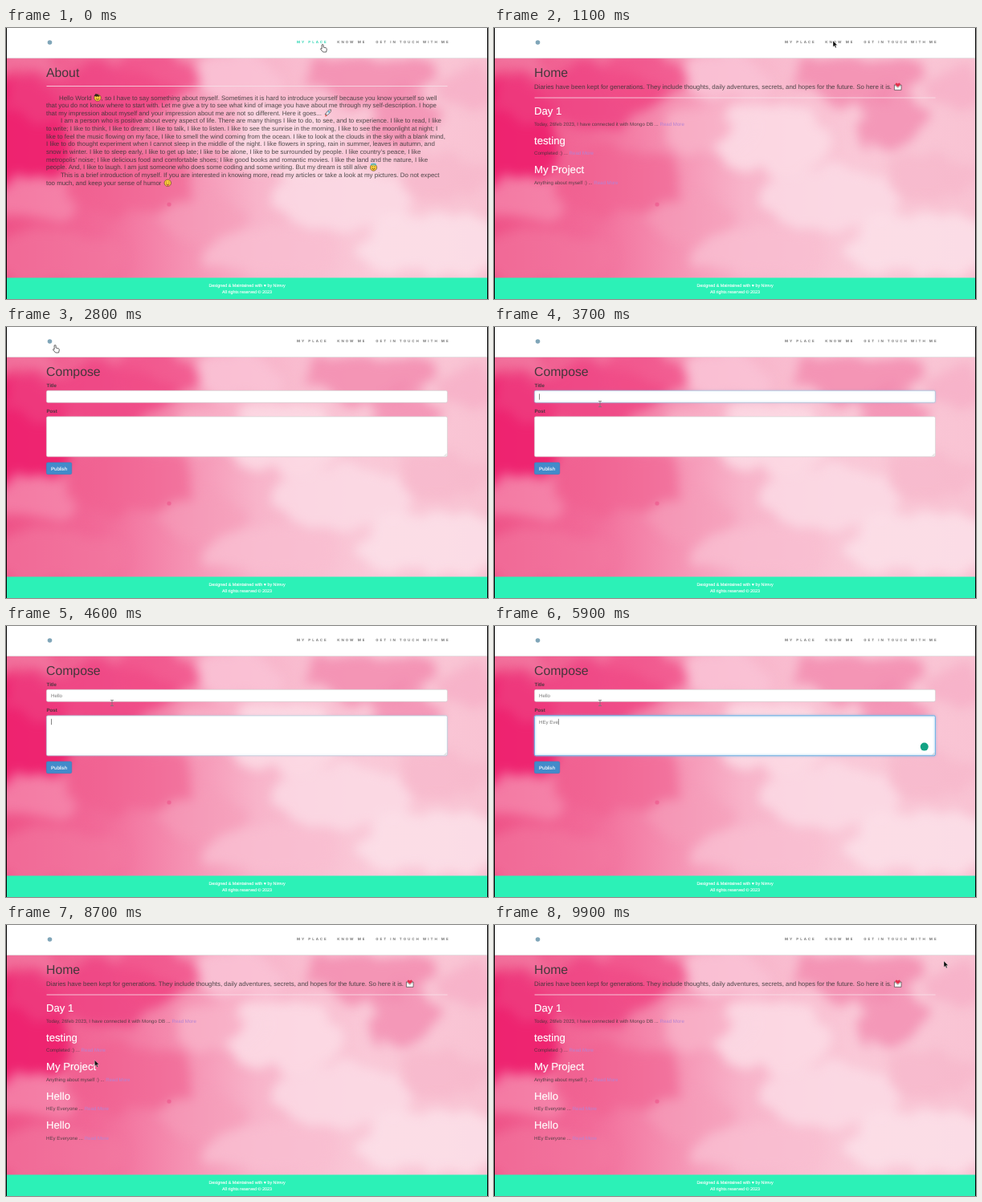
Animation of 600 by 338 pixels, one loop 10000 ms. Source, as an HTML page:

```html
<!DOCTYPE html>
<html lang="en">
<head>
<meta charset="utf-8">
<style>
html, body { margin: 0; width: 100%; height: 100%; overflow: hidden; background: #000 }
svg { display: block }
text { font-family: "Liberation Sans", Arial, sans-serif; text-rendering: geometricPrecision; white-space: pre }
.h1 { font-size: 15.8px; fill: #333; fill-opacity: .9 }
.h2 { font-size: 13.16px; fill: #fff; stroke: #fff; stroke-width: .15 }
.lead { font-size: 7.9px; fill: #333; fill-opacity: .86 }
.small { font-size: 6.14px; fill: #333; fill-opacity: .8 }
.link { fill: #b583d3; fill-opacity: 1 }
.label { font-size: 6.14px; font-weight: bold; fill: #333; fill-opacity: .85 }
.input { font-size: 6.14px; fill: #777 }
.nav text { font: bold 4.4px Inter, sans-serif; letter-spacing: 2px; fill: #777 }
.foot { font-size: 5.4px; fill: #fff; stroke: #fff; stroke-width: .12; text-anchor: middle }
.field { fill: #fff; stroke: #ccc; stroke-width: .6 }
.glow { fill: none; stroke: #66afe9; stroke-width: .9; filter: drop-shadow(0 0 1.6px #66afe9) }
</style>
</head>
<body>
<svg width="600" height="338" viewBox="0 0 600 338">
  <defs>
    <linearGradient id="wash">
      <stop offset="0" stop-color="#ef5388"/>
      <stop offset=".2" stop-color="#f26b99"/>
      <stop offset=".36" stop-color="#f58fb1"/>
      <stop offset=".52" stop-color="#f8b4ca"/>
      <stop offset=".75" stop-color="#fac9d8"/>
      <stop offset="1" stop-color="#f9c3d3"/>
    </linearGradient>
    <filter id="water" filterUnits="userSpaceOnUse" x="-40" y="0" width="680" height="350" color-interpolation-filters="sRGB">
      <feTurbulence type="fractalNoise" baseFrequency=".022" numOctaves="3" seed="8"/>
      <feDisplacementMap in="SourceGraphic" scale="46" xChannelSelector="R" yChannelSelector="G"/>
      <feGaussianBlur stdDeviation="7"/>
    </filter>
    <clipPath id="stage"><rect x="1" y="37" width="598" height="275"/></clipPath>
    <g id="face">
      <circle r="4.2" fill="#ffd03b" stroke="#4b3520" stroke-width=".6"/>
      <path d="M-2-1.2h1M1-1.2h1M-2 1q2 2.6 4 0" fill="none" stroke="#4b2c18" stroke-width=".8"/>
    </g>
  </defs>

  <g clip-path="url(#stage)">
    <rect y="37" width="600" height="275" fill="url(#wash)"/>
    <g id="blobs" filter="url(#water)"></g>
    <circle cx="203" cy="220" r="2.6" fill="#ee5c8f" opacity=".75"/>
  </g>

  <g class="nav">
    <rect x="1" width="598" height="37.5" fill="#fff"/>
    <path d="M1 37.5h598" stroke="#ddd" stroke-width=".7"/>
    <circle cx="54.5" cy="18" r="2.8" fill="#7fa5b8"/>
    <text id="place" x="362" y="19.4">MY PLACE</text>
    <text x="412.3" y="19.4">KNOW ME</text>
    <text x="460.3" y="19.4">GET IN TOUCH WITH ME</text>
  </g>

  <g id="about">
    <text class="h1" x="50" y="60.5">About</text>
    <path d="M50.5 72.5h499" stroke="#f7e3ea" stroke-width=".8"/>
    <g id="story"></g>
    <use href="#face" x="114" y="87"/>
    <path d="M109.500 85l2-3 3 1 2.500 2-3 .6z" fill="#33271c"/>
    <g transform="translate(401 106)">
      <path d="M-4 2l3-4q2-2.400 4.600-2.200.2 2.800-2 4.700l-3.800 3-.3-2z" fill="#e4e7ee" stroke="#333" stroke-width=".6"/>
      <circle cx="1" cy="-1.500" r="1" fill="#3b9ac8"/>
      <path d="M-3 2l-1 2.400 2.400-1z" fill="#f0402f"/>
    </g>
    <use href="#face" x="457.500" y="174"/>
    <ellipse cx="457.500" cy="170" rx="3.300" ry="1" fill="none" stroke="#35c6dd" stroke-width=".9"/>
    <use href="#face" x="201.300" y="193.300"/>
    <path d="M200.500 195.400h2v1.500q-1 .9-2 0z" fill="#ee4561"/>
  </g>

  <g id="home">
    <text class="h1" x="50" y="60.5">Home</text>
    <text class="lead" x="50" y="75.600">Diaries have been kept for generations. They include thoughts, daily adventures, secrets, and hopes for the future. So here it is.</text>
    <g transform="translate(502.700 73)">
      <path d="M-4.300-2h8.600v6.300h-8.600z" fill="#fff" stroke="#444" stroke-width=".7"/>
      <path d="M-4.300-2l4.300 3.600 4.300-3.600" fill="none" stroke="#777" stroke-width=".6"/>
      <path d="M0 .8l-2.800-2.600q-.8-2.300 1.300-2.600l1.500.9 1.500-.9q2.100.3 1.300 2.600z" fill="#e2314c"/>
    </g>
    <path d="M50.500 87h499" stroke="#f9e3eb" stroke-width=".8"/>
    <g id="posts"></g>
  </g>

  <g id="compose">
    <text class="h1" x="50" y="60.5">Compose</text>
    <text class="label" x="50.500" y="75">Title</text>
    <rect class="field" x="50.400" y="79.300" width="499" height="15" rx="1.700"/>
    <rect class="glow" id="glow1" x="50.400" y="79.300" width="499" height="15" rx="1.700"/>
    <text class="input" id="title" x="56" y="89"></text>
    <text class="label" x="50.500" y="107.400">Post</text>
    <rect class="field" x="50.400" y="111.800" width="499" height="50" rx="1.700"/>
    <rect class="glow" id="glow2" x="50.400" y="111.800" width="499" height="50" rx="1.700"/>
    <path d="M545.500 161l3-3M547.300 161l1.200-1.200" stroke="#999" stroke-width=".4"/>
    <text class="input" id="post" x="56" y="121.500"></text>
    <path id="caret" stroke="#333" stroke-width=".6"/>
    <circle id="helper" cx="535.700" cy="150.600" r="5" fill="#12a384"/>
    <rect id="button" x="50.300" y="169" width="31.500" height="14.700" rx="1.700" stroke="#357ebd" stroke-width=".5"/>
    <text x="56" y="178.500" font-size="6.14" fill="#fff" stroke="#fff" stroke-width=".1">Publish</text>
  </g>

  <rect x="1" y="311.500" width="598" height="27" fill="#2cf1b7"/>
  <text class="foot" x="300" y="323">Designed &amp; Maintained with ♥ by Nimvy</text>
  <text class="foot" x="300" y="330.500">All rights reserved © 2023</text>

  <g id="cursor">
    <path id="arrow" d="M0 0v7.500l1.800-1.600 1.200 2.800 1.200-.5-1.200-2.700h2.400z" fill="#111" stroke="#fff" stroke-width=".3"/>
    <path id="hand" transform="translate(-3.300 0)" d="M2.400 1q1-1.200 2 0v3l3.200.8q1.300.5 1 2l-.7 3.200h-4l-3.200-3.800q.2-1.300 1.700-.2z" fill="#fff" stroke="#333" stroke-width=".75"/>
    <path id="beam" d="M-2-3.500h4M0-3.500v7M-2 3.500h4" fill="none" stroke="#777" stroke-width=".8"/>
  </g>
</svg>

<script>
const $ = id => document.getElementById(id);
const show = (id, on) => $(id).style.display = on ? '' : 'none';
const clamp = v => Math.max(0, Math.min(1, v));

// Watercolour patches: x, y, rx, ry, colour, opacity
const patches = [
  [10, 130, 72, 66, '#ee1f6d', .9],
  [105, 85, 105, 36, '#ee3f80', .75],
  [185, 58, 46, 38, '#f04c87', .75],
  [20, 44, 50, 12, '#f27fa6', .7],
  [30, 215, 55, 26, '#f79bbb', .55],
  [150, 190, 80, 45, '#f1608f', .6],
  [60, 285, 90, 34, '#f27ca3', .55],
  [290, 62, 65, 30, '#fac3d5', .9],
  [270, 130, 55, 32, '#f9b4ca', .75],
  [350, 140, 70, 44, '#fcdbe5', .9],
  [455, 62, 78, 32, '#f390b2', .9],
  [490, 115, 42, 38, '#f289ae', .75],
  [575, 75, 35, 34, '#f7b0c7', .8],
  [420, 215, 85, 42, '#fcdce6', .8],
  [545, 185, 55, 28, '#f7b7ca', .7],
  [530, 270, 80, 40, '#fce1e9', .85],
  [330, 280, 80, 32, '#f9bfd1', .8],
  [240, 235, 55, 30, '#f59db9', .6]
];
$('blobs').innerHTML = patches.map(([x, y, rx, ry, c, o]) =>
  `<ellipse cx="${x}" cy="${y}" rx="${rx}" ry="${ry}" fill="${c}" opacity="${o}"/>`).join('');

const story = [
  'Hello World',
  'that you do not know where to start with. Let me give a try to see what kind of image you have about me through my self-description. I hope',
  'that my impression about myself and your impression about me are not so different. Here it goes...',
  'I am a person who is positive about every aspect of life. There are many things I like to do, to see, and to experience. I like to read, I like',
  'to write; I like to think, I like to dream; I like to talk, I like to listen. I like to see the sunrise in the morning, I like to see the moonlight at night; I',
  'like to feel the music flowing on my face, I like to smell the wind coming from the ocean. I like to look at the clouds in the sky with a blank mind,',
  'I like to do thought experiment when I cannot sleep in the middle of the night. I like flowers in spring, rain in summer, leaves in autumn, and',
  'snow in winter. I like to sleep early, I like to get up late; I like to be alone, I like to be surrounded by people. I like country’s peace, I like',
  'metropolis’ noise; I like delicious food and comfortable shoes; I like good books and romantic movies. I like the land and the nature, I like',
  'people. And, I like to laugh. I am just someone who does some coding and some writing. But my dream is still alive',
  'This is a brief introduction of myself. If you are interested in knowing more, read my articles or take a look at my pictures. Do not expect',
  'too much, and keep your sense of humor'
];
const indent = { 0: 66, 3: 68, 10: 68 };
$('story').innerHTML = story.map((s, i) =>
  `<text class="lead" x="${indent[i] || 50}" y="${89.5 + i * 9.64}">${s}</text>`).join('') +
  '<text class="lead" x="118.5" y="89.5">, so I have to say something about myself. Sometimes it is hard to introduce yourself because you know yourself so well</text>';

const posts = [
  ['Day 1', 'Today, 26feb 2023, I have connected it with Mongo DB'],
  ['testing', 'Completed :)'],
  ['My Project', 'Anything about myself :)'],
  ['Hello', 'HEy Everyone'],
  ['Hello', 'HEy Everyone']
];
$('posts').innerHTML = posts.map(([head, body], i) => `<g>
  <text class="h2" x="50" y="${108 + i * 36.5}">${head}</text>
  <text class="small" x="50" y="${121.6 + i * 36.5}">${body} ... <tspan class="link">Read More</tspan></text></g>`).join('');

// Pointer stops: time, x, y
const path = [[0, 394, 20], [300, 394, 20], [1100, 422, 16], [2000, 61, 22], [2950, 61, 22],
  [3600, 132, 96], [6900, 132, 96], [7600, 74, 178.5], [8500, 74, 178.5], [9700, 560, 45], [10000, 560, 45]];
const shapes = [[0, 'hand'], [400, 'arrow'], [1900, 'hand'], [3100, 'arrow'], [3450, 'beam'],
  [7250, 'arrow'], [7450, 'hand'], [8300, 'arrow']];

function pointer(t) {
  const i = path.findIndex(p => p[0] > t);
  const [a, x, y] = path[i - 1], [b, u, v] = path[i];
  const k = (t - a) / (b - a), e = k * k * (3 - 2 * k);
  return [x + (u - x) * e, y + (v - y) * e];
}

const typed = (s, t, start, step) => s.slice(0, Math.max(0, Math.floor((t - start) / step)));

function draw(t) {
  const page = t < 600 ? 'about' : t < 2300 || t >= 8300 ? 'home' : 'compose';
  for (const p of ['about', 'home', 'compose']) show(p, p === page);
  [...$('posts').children].forEach((g, i) => g.style.display = i < 3 || t > 5000 ? '' : 'none');
  $('place').style.fill = t < 400 ? '#2fd6b4' : '';

  if (page === 'compose') {
    const inPost = t >= 4550;
    const field = $(inPost ? 'post' : 'title');
    $('title').textContent = typed('Hello', t, 3750, 130);
    $('post').textContent = typed('HEy Everyone', t, 4700, 170);
    $('glow1').style.opacity = clamp((t - 3650) / 150) * clamp((4600 - t) / 100);
    $('glow2').style.opacity = clamp((t - 4570) / 150);
    const x = 56.5 + (field.textContent ? field.getComputedTextLength() : 0);
    $('caret').setAttribute('d', `M${x} ${inPost ? 115.8 : 83.3}v7.4`);
    show('caret', t > 3650 && (t < 6900 || t % 1000 > 500));
    show('helper', t >= 5000);
    $('button').style.fill = t >= 7450 ? '#3071a9' : '#428bca';
  }

  const shape = shapes.filter(s => s[0] <= t).pop()[1];
  for (const s of ['arrow', 'hand', 'beam']) show(s, s === shape);
  $('cursor').setAttribute('transform', `translate(${pointer(t)})`);
}

function tick() {
  draw(performance.now() % 10000);
  requestAnimationFrame(tick);
}
tick();
</script>
</body>
</html>
```
